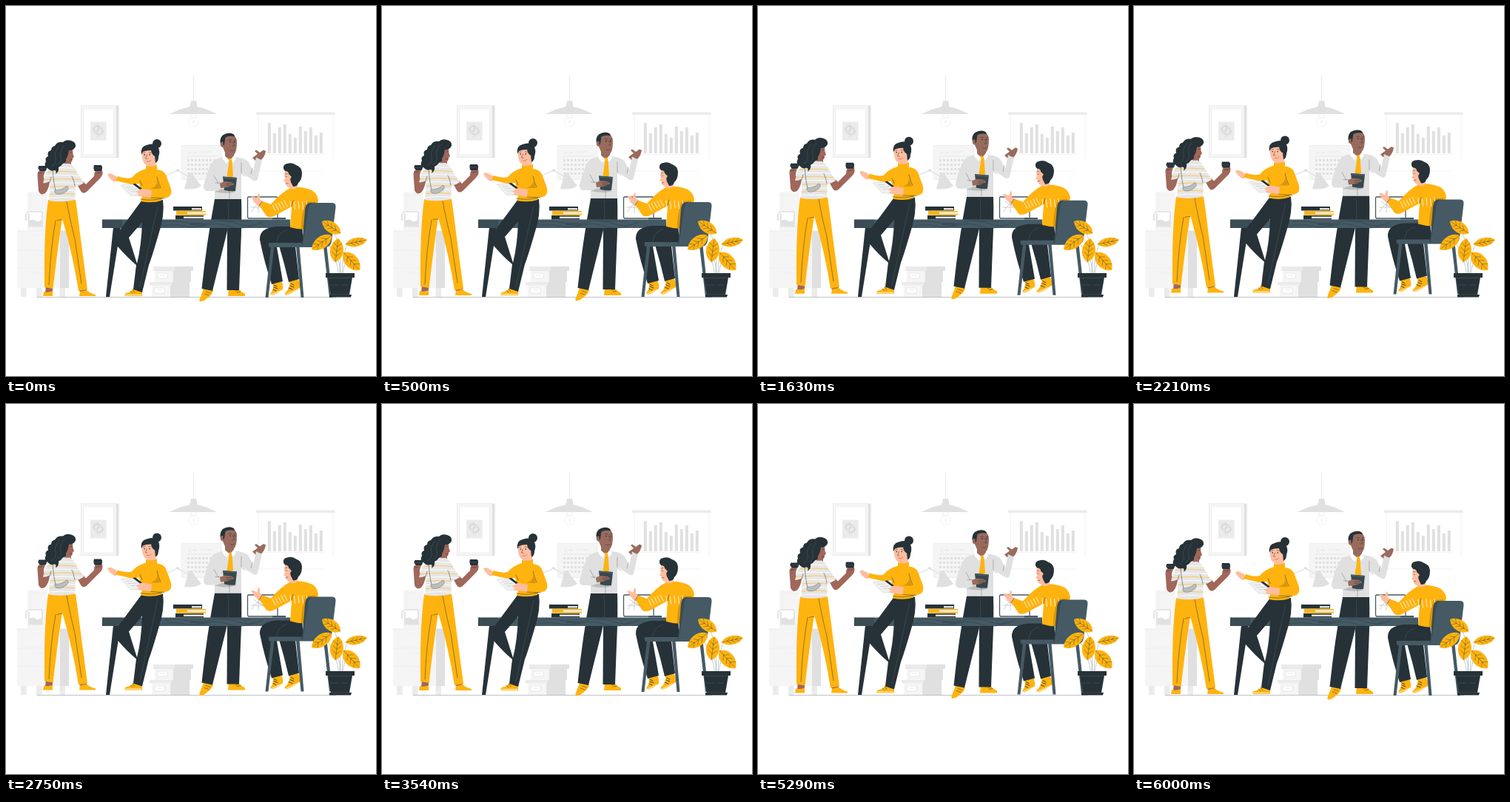
Animation of 500x500 px, one loop 6040 ms. Source, as an HTML page:

```html
<!DOCTYPE html>
<html lang="en">
<head>
<meta charset="utf-8">
<title>Office team</title>
<style>
html, body { margin: 0; width: 100%; height: 100%; overflow: hidden; background: #fff; }
svg { display: block; width: 100vw; height: 100vh; }
.y { fill: #ffb30f; }
.k { fill: #263238; }
.s { fill: #455a64; }
.g1 { fill: #f5f5f5; }
.g2 { fill: #ebebeb; }
.g3 { fill: #e0e0e0; }
.w { fill: #fff; }
.brown { fill: #a0675a; }
.dark { fill: #996b5c; }
.peach { fill: #ffbd9f; }
.shirt { fill: #e0e0e0; }
.shade { fill: #000; opacity: .16; }
.l { fill: none; stroke: #263238; stroke-width: .5; stroke-linecap: round; stroke-linejoin: round; }
.lg { fill: none; stroke: #e0e0e0; stroke-width: .7; }
.ls { fill: none; stroke: #5d7079; stroke-width: .5; stroke-opacity: .7; }
.lw { fill: none; stroke: #fff; stroke-width: .8; stroke-linecap: round; }
</style>
</head>
<body>
<svg viewBox="0 0 500 500">
  <defs>
    <clipPath id="tee"><path id="teeShape" d="M63 216Q73 213 86 213Q92 216 96 225L105 239Q100 243 94 244L93 262Q76 266 58 263L60 240L59 237Q53 240 50 239Q54 222 63 216Z"/></clipPath>
  </defs>

  <!-- picture -->
  <path class="g3" d="M101 134.500H152.500V205H101Z"/>
  <path class="g1" d="M101.500 135H149V204.500H101.500Z"/>
  <path class="w" stroke="#ebebeb" stroke-width=".7" d="M105 139H145.500V201H105Z"/>
  <path class="g2" d="M114 156.500H135.500V181.500H114Z"/>
  <g class="lg" style="stroke:#d4d4d4">
    <circle cx="124.500" cy="168" r="5.500"/><circle cx="122" cy="165" r="4"/><circle cx="127" cy="170" r="4"/>
    <path d="M117 167Q124 157 132 169Q125 180 117 167M124 158V178"/>
  </g>

  <!-- ceiling lamp -->
  <path class="lg" d="M253.500 94V129"/>
  <circle class="lg" cx="253.500" cy="157" r="6.500" style="stroke:#ededed"/>
  <path class="lg" style="stroke:#ededed" d="M250 146V151M257 146V151M252 156L253.500 159L255 154"/>
  <path class="g3" d="M250 128H257L258.500 136Q269 138 285 146H221Q237 138 248.500 136Z"/>

  <!-- calendar and desk lamp -->
  <path class="g1" stroke="#e8e8e8" stroke-width=".7" d="M237.500 188.500H291V234.500H237.500Z"/>
  <path class="lg" d="M246 198H250M253 197.500H257M263 197H277M244 203H286"/>
  <g id="days" class="g3"></g>
  <path class="lg" style="stroke-width:1.300" d="M210 232L232 222L249 232"/>
  <circle class="g3" cx="232" cy="222" r="2"/>
  <path class="g3" d="M246.500 227Q249 224 251.500 227L264 243Q254 249 241 247Z"/>

  <!-- wall chart -->
  <path class="lg" style="stroke:#ededed" d="M341.500 147V223H428M442 147V207"/>
  <path class="g2" d="M338 143.500H444.500V147H338Z"/>
  <g id="bars" class="g3"></g>
  <path class="lg" style="stroke:#ededed" d="M350 200.500H431"/>

  <!-- cabinet and coffee machine -->
  <path class="g1" d="M29 251.500H56V303H29Z"/>
  <path class="lg" style="stroke:#ebebeb" d="M29 256H55M33 251V275"/>
  <path class="w" d="M30 278H49L50 299H30Z"/>
  <path class="g3" d="M32 290Q36 287 40 290T48 289V297H32Z"/>
  <path class="lg" style="stroke-width:1.700" d="M49 278H33Q27 278 27 284V290M31 281V298H49V279"/>
  <path class="g2" d="M20 380H27.500V393H20ZM41 380H48.500V393H41ZM72.500 380H80V393H72.500Z"/>
  <path class="g1" d="M15 303.500H73V381H15Z"/>
  <path class="g3" d="M73 303.500H85V381H73Z"/>
  <path class="lg" style="stroke:#ebebeb" d="M15 304H73M15 330H73M15 354H73M38 310H50M38 337H50M38 361H50"/>

  <!-- archive boxes -->
  <path class="g3" d="M199 352H253V358H250V373H248V393H222V377H194V373H201V358H199Z"/>
  <path class="g1" d="M201 358H226V373H201ZM197 377.500H222V393H197Z"/>
  <path class="g2" d="M199 352H228V357.500H199ZM194 373H224V377.500H194Z"/>
  <path class="w" stroke="#e0e0e0" stroke-width=".7" d="M205 361H218V368H205ZM201 381H214V388H201Z"/>
  <path class="lg" d="M208 364H215M204 384H211"/>

  <path class="l" stroke-opacity=".6" d="M42 393.500H446"/>

  <!-- standing man -->
  <g class="float">
    <path class="y" d="M267 382L280 384Q279 390 273 394Q268 399 262 399.500Q260.500 398 262.500 394ZM301 382H314Q318 387 323 389V392H300Z"/>
    <path class="l" d="M268 389L274 391M270 386L276 388M310 385L314 384M312 387L317 386"/>
    <path class="k" d="M282 261H318Q319 290 317 330L315 384H298.500L299 304L279 385L264.500 382Q271 320 282 261Z"/>
    <path class="ls" d="M300 264Q302 290 299 306"/>
    <path class="dark" d="M333 205L340 200L336 196L338 194.500L343 198L348 194.500L351 196Q350 203 345 208L340 212Z"/>
    <path class="shirt" d="M297 204H309Q323 205 328 211L334 223L338 204.500Q342 207 346 208L340 234Q338 238 333 235L318 225V261H282V250H270Q265 246 268 239Q275 214 281 209Q286 205 297 204Z"/>
    <path class="shade" d="M282 251L293 247L311 251Q300 255 282 251Z"/>
    <path class="l" stroke-opacity=".6" d="M281 229L287 240M283 239H292M318 212V226L323 230M331 227L333 219M302 231V260"/>
    <path class="dark" d="M296 194H308V204L303 209L296 205Z"/>
    <path class="w" d="M295 202L302 208L298 213L292 206ZM308 202L303 208L307 212L311 206Z"/>
    <path class="y" d="M301 206H304.500L305.500 210L307 230L303 234L298.500 230L301.500 210Z"/>
    <path class="dark" d="M293 178Q297 172 305 173Q312 176 312 184Q312 197 308 201Q302 204 296 198L293 191Q289 190 290 186Q291 183 293 184Z"/>
    <path class="k" d="M290 187Q288 179 293 174.500Q300 170 307 173Q309 174 309 176.500Q302 174.500 296.500 177.500L295 187L293.500 189V184Q290.500 183 290 187Z"/>
    <path class="l" d="M300.500 181Q303 179.500 305 181M308 181L311 180.500M306.500 183L309 189H306M303 195Q307 197 309 194"/>
    <path class="k" d="M302.200 183.500a.8 .9 0 1 0 1.600 0a.8 .9 0 1 0-1.600 0M308.200 183.500a.8 .9 0 1 0 1.600 0a.8 .9 0 1 0-1.600 0"/>
    <path fill="#37474f" d="M293 230.500L312 232L310 250Q304 251 295 249Z"/>
    <path class="s" d="M293 230.500L312 232L311 234L293.500 233Z"/>
    <path class="dark" d="M289 240L295 237L304 238Q308 239 308 241.500L299 245L290 246Z"/>
    <path class="l" d="M298 240.500L306 239.500M298 243L305 242"/>
  </g>

  <!-- desk, books, screen -->
  <path class="k" d="M145 299H155L140 393H135Z"/>
  <path class="s" d="M130 288.500H384V300H130Z"/>
  <path class="shade" d="M130 288.500H157V300H130Z"/>
  <path class="l" stroke-opacity=".65" d="M214 292Q230 289 246 293T278 292T312 294T347 292M211 297Q226 294 240 297T270 296T302 298T335 296M250 295Q258 292 266 295T250 295M290 291Q310 290 330 291"/>
  <path class="k" d="M226 271H265V276.500H226ZM229 283H267V288.500H229Z"/>
  <path fill="#e0e0e0" d="M251 273H264V275.500H251ZM240 284.500H267V287H240Z"/>
  <path class="y" d="M230 277H270V282.500H230Z"/>
  <path fill="#fff0cc" d="M245 278.500H271V281H245Z"/>
  <path class="w" stroke="#455a64" stroke-width="1.300" d="M327.500 258H365Q367 258 367 260V287H327.500Q326.500 286 326.500 284V260Q326.500 258 327.500 258Z"/>
  <path class="lg" style="stroke:#b8bec1" d="M332 278Q339 263 346 271T361 265M334 264L358 280M341 262V279M331 272H350"/>
  <path class="s" d="M360 286H378V288.500H360Z"/>

  <!-- woman with cups -->
  <g class="float">
    <path class="brown" d="M54 378H63V387H53ZM98 379L107 377L110 387H100Z"/>
    <path class="y" d="M51 386Q57 388 63 385V392H50ZM100 386L109 384Q113 388 121 390V392H99Z"/>
    <path class="y" d="M57 262H94Q97 282 101 315L110 383L98 385Q91 339 76 287Q69 333 63.500 382L52 380Q51 305 57 262Z"/>
    <path class="l" d="M82 264Q86 287 93 315L102 375M76 289Q73 288 69 290M67 290Q60 330 58 377"/>
    <path class="brown" d="M51 233L59 238Q58 247 53 253Q47 257 44 250L42.500 229Q42 223 47 222L53 223L51 229ZM96 241L104 237L108 241L119 230Q119 222 124 221L130 222Q132 228 127 233L109 251Q104 255 101 250Z"/>
    <path class="brown" d="M80 205H88V214Q85 219 79 216Z"/>
    <use href="#teeShape" fill="#e6e6e6"/>
    <g id="stripes" clip-path="url(#tee)" fill="none" stroke-width=".9"></g>
    <path class="l" d="M63 220Q64 238 67 249M93 243Q91 233 89 230M59 238L61 231"/>
    <path fill="#bdbdbd" stroke="#455a64" stroke-width=".4" d="M66 249Q77 249 82 243Q86 245 83 249Q76 256 68 254Q65 252 66 249Z"/>
    <path class="brown" d="M79 191Q87 189 90 194L90.500 200L92 204L90 206Q90 211 86 212Q80 212 77 205Z"/>
    <path class="k" d="M66 189Q69 183 77 184Q81 180 88 182Q95 184 94 190Q91 196 85 195Q84 203 81 207Q82 212 77 213Q74 217 71 218Q72 224 67 227Q69 222 65 222Q61 224 57 220Q50 216 54 210Q52 205 57 203Q55 196 61 195Q61 190 66 189Z"/>
    <path class="l" d="M87 198L89 197.500M86 208L89 207.500"/>
    <path class="ls" stroke-opacity=".5" d="M72 190Q65 197 67 205T61 217M79 188Q72 196 74 204T69 215"/>
    <path class="k" d="M44.500 216H54L55 218V220L53.500 223H46L43.500 220V218ZM119 215H128.500L130 217V220L129 223H119.500L118.500 220V217Z"/>
    <path class="ls" d="M44 219.500H54.500M118.500 219H129.500"/>
    <path class="l" d="M122 226L128 225M44 226L49 225"/>
  </g>

  <!-- woman with clipboard -->
  <g class="float">
    <path class="y" d="M172 382L184 385V392H161Q159 390 162 388Q169 387 172 382Z"/>
    <path class="lw" d="M161 390.500H183"/>
    <path class="l" d="M168 385L171 388M171 383L174 387"/>
    <path class="k" fill-rule="evenodd" d="M184 262H212Q215 282 206 309Q197 340 193 350L184 387L172 383L176 350Q164 340 151 325Q146 315 153 304ZM166 313L184 292Q183 324 177 348Z"/>
    <path class="ls" d="M205 270Q194 320 181 380"/>
    <path class="peach" d="M137 228Q139 225 143 227L149 230L152 235L147 238Q142 236 137 228Z"/>
    <path class="y" d="M189 216Q196 218 204 215V221Q213 222 216 228L223 247Q225 257 217 259L211 260L210 263Q198 267 182 264L184 257L180 240L169 241L148 236L151 230Q163 234 170 232Q176 224 189 220Z"/>
    <path class="shade" d="M204 236L208 247H195Q205 244 204 236Z"/>
    <path class="l" d="M204 231Q206 240 209 246M182 261Q196 264 211 260M184 243L181 236M195 259L214 260"/>
    <path fill="#f0f0f0" stroke="#cfd4d6" stroke-width=".6" d="M155 242L171 241L186 249L188 257L168 256Z"/>
    <path class="k" d="M171 240.500L175 240L184 247L181 248Z"/>
    <path class="lg" style="stroke:#c5cacc" d="M162 245L171 244.500M165 248L177 247.500M169 251L181 250.500"/>
    <path class="peach" d="M197 249L184 247L176 251Q178 254 181 253L177 255Q180 258 185 257L196 259Z"/>
    <path class="peach" d="M189 208L202 204L203 217Q197 222 190 217Z"/>
    <path class="y" d="M189 216Q196 218.500 204 215V222H189Z"/>
    <path class="peach" d="M184 197Q193 190 203 197Q204 208 199 214Q193 219 187 213Q183 207 184 197Z"/>
    <circle class="k" cx="204" cy="186" r="6"/>
    <path class="k" d="M183 201Q181 190 190 188Q199 184 205 190Q209 196 206 204Q206 210 202 212L201 203Q197 201 196 195Q189 195 185 197Z"/>
    <path class="k" d="M186.500 201a.7 .9 0 1 0 1.400 0a.7 .9 0 1 0-1.400 0M193.500 201a.7 .9 0 1 0 1.400 0a.7 .9 0 1 0-1.400 0"/>
    <path class="l" d="M185.500 198.500L188 198M193 198Q195 197 196.500 198.500M190.500 201L188.500 206L191 206.500"/>
    <path class="l" style="stroke:#b0443c" d="M190 210Q193 211.500 196 208.500"/>
    <path class="ls" d="M201 204Q204 203 203 208"/>
  </g>

  <!-- seated man and chair -->
  <g class="float">
    <path class="y" d="M360 374L372 371Q375 378 374 383Q368 388 359 391L357 389Q363 382 360 374ZM383 371L394 368Q398 375 397 381Q391 386 379 391L376 389Q385 381 383 371Z"/>
    <path class="l" style="stroke-width:.9" d="M362 377L366 379M362 380L367 382M361 383L365 385M385 375L389 377M384 378L389 380M382 381L387 383"/>
    <path class="lw" d="M358 390L373 384M378 390L396 382"/>
    <path class="k" d="M400 298H365Q342 300 343 316Q349 346 359 376L374 372L366 326L369 324Q376 347 382 373L396 369L391 325L402 320Z"/>
    <path class="ls" d="M380 303Q364 306 366 326"/>
    <path class="s" d="M358 325H362.500L354.500 394H350.500ZM392 325H396.500L402.500 394H398.500ZM429 325H433.500L441 394H437Z"/>
    <path class="peach" d="M331 257L336 258L339 260L341 253L343 255L343 261L349 266L343 272Q335 266 331 257Z"/>
    <path class="y" d="M384 246Q394 243 408 247Q420 250 422 262L415 300Q401 304 384 299L386 271L364 283Q357 287 352 284L342 269L347 264L358 268Q372 252 384 246Z"/>
    <path class="shade" d="M405 265Q398 284 399 305H418V264Z"/>
    <path class="l" d="M386 271L388 263M346 264L342 270"/>
    <g id="stitches" class="lw"></g>
    <path class="peach" d="M383 234H394V245Q388 250 382 245Z"/>
    <path class="peach" d="M378 221Q375 229 377 233L375 237L378 238Q377 243 382 245Q389 245 394 239L393 224Z"/>
    <path class="k" d="M375 220Q374 214 380 213Q387 211 392 215Q399 217 400 225Q400 235 395 239Q394 244 388 244L385 238Q383 233 386 231L382 227Q382 223 377 223Z"/>
    <path class="l" d="M377.500 227L380 226.500M378 230.500H379.500M378 240L381 239.500"/>
    <path class="s" d="M355 320H400Q402 306 404 276Q405 266 411 266H441Q446 266 445.500 272L440 318Q439 325 432 326H356Q354 324 355 320Z"/>
    <path class="shade" d="M411 266H414Q409 268 408 277L401 324H399L404 276Q405 266 411 266Z"/>
  </g>

  <!-- plant -->
  <path class="ls" d="M451 361Q455 330 442 302M449 361Q449 345 434 318M452 361Q452 349 447 338M454 361Q455 330 463 321M455 361Q457 350 460 340"/>
  <g id="leaves"></g>
  <path class="k" d="M432 361H471V367H468L464 390H467L466 393.500H437V390H439L435 367H432Z"/>
  <path class="ls" d="M435 367.500H468M438 377H450M453 377H463M439 390H464"/>
</svg>
<script>
const $ = id => document.getElementById(id);
const floats = document.querySelectorAll('.float');
const PERIOD = 6040, RISE = 6;

$('bars').innerHTML = [158, 172, 164, 160, 173, 178, 163, 169, 164, 175, 171]
  .map((top, i) => `<path d="M${353.8 + i * 7} ${top}h4V199h-4Z"/>`).join('');

let days = '';
for (let row = 0; row < 4; row++)
  for (let col = 0; col < 8; col++)
    days += `<path d="M${245 + col * 5} ${207 + row * 6}h3v3h-3Z"/>`;
$('days').innerHTML = days;

let stripes = '';
for (let i = 0; i < 9; i++) {
  const y = 219 + i * 5;
  stripes += `<path stroke="${i % 2 ? '#ffc64d' : '#fff'}" d="M48 ${y + 1}Q76 ${y - 2} 106 ${y + 1}"/>`;
}
$('stripes').innerHTML = stripes;

let stitches = '';
for (let i = 0; i < 5; i++) {
  stitches += `<path d="M${360 + i * 4} ${269 - i * 1.5}l4 8"/>`;
  stitches += `<path d="M${384 + i * 5.5} ${264 + i % 2}l1 10"/>`;
}
$('stitches').innerHTML = stitches;

// A leaf runs from its base to its tip, bulging by the given width.
function leaf(x, y, tx, ty, width) {
  const dx = tx - x, dy = ty - y, len = Math.hypot(dx, dy);
  const at = (along, side) =>
    `${(x + dx * along - dy / len * side).toFixed(1)} ${(y + dy * along + dx / len * side).toFixed(1)}`;
  let veins = `M${at(0, 0)}L${at(.92, 0)}`;
  for (const a of [.25, .45, .65])
    for (const side of [-1, 1]) veins += `M${at(a, 0)}L${at(a + .15, side * width * .45)}`;
  return `<path class="y" d="M${at(0, 0)}C${at(.2, width)} ${at(.75, width)} ${at(1, 0)}C${at(.75, -width)} ${at(.2, -width)} ${at(0, 0)}Z"/>
    <path class="l" style="stroke-width:.4" d="${veins}"/>`;
}
$('leaves').innerHTML = [
  [452, 307, 427, 291, 10], [440, 310, 413, 329, 11], [445, 346, 449, 314, 12],
  [459, 322, 488, 316, 8], [456, 333, 478, 357, 12]
].map(args => leaf(...args)).join('');

const start = performance.now();
function draw(now) {
  const phase = Math.max(0, now - start) % PERIOD / PERIOD;
  const y = -RISE * (1 - Math.abs(2 * phase - 1));
  floats.forEach(el => el.setAttribute('transform', `translate(0 ${y.toFixed(3)})`));
  requestAnimationFrame(draw);
}
draw(start);
</script>
</body>
</html>
```
